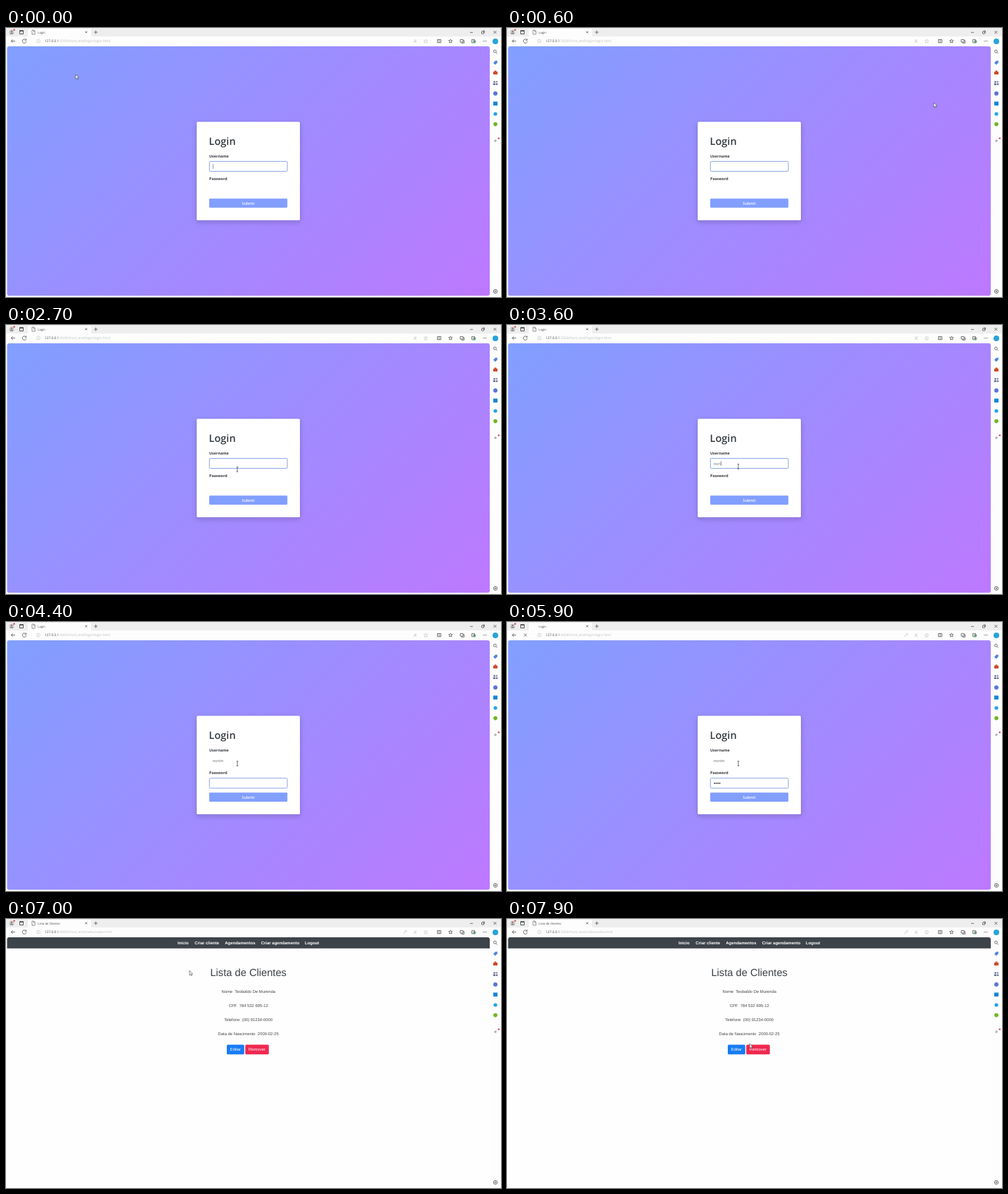
An HTML page for the animation above (8 s loop, 704 by 382 pixels).

```html
<!DOCTYPE html>
<html lang="pt">
<head>
<meta charset="utf-8">
<title>Login</title>
<style>
html, body { margin: 0; width: 100%; height: 100%; overflow: hidden; background: #fff; }
svg { display: block; width: 100vw; height: 100vh; }
text { white-space: pre; text-rendering: geometricPrecision; }
.ui { font-family: "Open Sans", "Noto Sans", sans-serif; }
.site { font-family: "Liberation Sans", Arial, sans-serif; font-size: 5.87px; fill: #43474b; }
.label { font-size: 5.4px; font-weight: 700; fill: #363a40; }
.mid { text-anchor: middle; }
.nav { font-size: 6px; font-weight: 700; fill: #fff; }
.line { fill: none; stroke: #555; stroke-width: .8; }
.faint { stroke: #ccc; }
</style>
</head>
<body>
<svg viewBox="0 0 704 382" preserveAspectRatio="none">
  <defs>
    <linearGradient id="sky" gradientUnits="userSpaceOnUse" x1="85" y1="-57" x2="605" y2="463">
      <stop stop-color="#819fff"/><stop offset="1" stop-color="#bd78ff"/>
    </linearGradient>
    <filter id="shadow" x="-20%" y="-20%" width="140%" height="140%">
      <feDropShadow dx="0" dy="2.5" stdDeviation="3.5" flood-color="#222" flood-opacity=".22"/>
    </filter>
  </defs>

  <!-- browser window -->
  <rect width="704" height="382" fill="#fdfdfd"/>
  <rect width="704" height="12" fill="#eee"/>
  <path d="M31 12V3q0-2 2-2H119q2 0 2 2V12Z" fill="#fdfdfd"/>
  <circle cx="8" cy="6" r="3.6" fill="#ccc"/>
  <circle cx="8" cy="4.8" r="1.3" fill="#888"/><path d="M5.6 8.6a2.4 2.2 0 0 1 4.8 0Z" fill="#888"/>
  <circle cx="11.6" cy="2.6" r="1.2" fill="#d13b3b"/>
  <path class="line" d="M19.5 3.5h5v5h-5ZM19.5 4.4h5" style="stroke:#333"/>
  <path id="tabIcon" class="line" d="M37 3h2.6l1.6 1.7V9H37ZM39.4 3v1.9h1.8" style="stroke-width:.6"/>
  <path class="line" d="m112.8 4.6 2.6 2.6m0-2.6-2.6 2.6M125.2 6h5M127.7 3.5v5M660 6.3h4M676.5 5h3v3h-3ZM677.8 4h2.6v2.8M693.4 4l4 4m0-4-4 4"/>
  <path class="line" d="M13 18.6H7.4m2.4-2.4-2.4 2.4 2.4 2.4"/>
  <path id="reload" class="line" d="M28.4 17a2.8 2.8 0 1 0 .5 2M28.7 15.4v1.9h-1.9"/>
  <path id="stop" class="line" d="m24.2 16.6 4 4m0-4-4 4"/>
  <g class="line faint">
    <circle cx="46" cy="18.6" r="2.5"/><path d="M46 18.2v1.6M46 17v.5"/>
    <path d="m580 21 1.7-4.5 1.7 4.5M580.7 19.6h2M583.8 16.5v1.2"/>
    <path d="m597 16 .8 1.8 2 .2-1.5 1.3.5 2-1.8-1-1.8 1 .5-2-1.5-1.3 2-.2Z"/>
    <path id="key" d="m565 21 2.7-2.8m-1.7 1.8.9.9M570 17.2a1.2 1.2 0 1 1-2.4 0 1.2 1.2 0 1 1 2.4 0"/>
  </g>
  <path class="line" d="M613.5 16.4h5v4.4h-5ZM616 16.4v4.4M629.5 17.6h2l.8-1.6.8 1.6h1.7l-1.3 1.4.4 2-1.6-1-1.7 1 .4-2ZM646 16.4h4v3.6h-4ZM648 20v1.4h3.5v-3.6H650M662.5 16.4h4v4.4h-4ZM664 18.6h4.4"/>
  <path d="M664.8 19h3v2.4h-3Z" fill="#4caf6a"/>
  <g fill="#555"><circle cx="679" cy="18.6" r=".6"/><circle cx="681" cy="18.6" r=".6"/><circle cx="683" cy="18.6" r=".6"/></g>
  <circle cx="696" cy="19" r="4" fill="#27a3d9"/>
  <g class="ui">
    <text id="tab" x="45.3" y="7.7" font-size="4.2" fill="#444"></text>
    <text x="55" y="20.4" font-size="4.8" fill="#444">127.0.0.1<tspan id="url" fill="#bdbdbd"></tspan></text>
  </g>

  <!-- sidebar -->
  <g class="line"><circle cx="695.4" cy="33.2" r="1.9"/><path d="m696.8 34.6 2 2"/></g>
  <path d="m693 49.5 3-3h2.8v2.8l-3 3Z" fill="#4f83d8"/>
  <path d="M693 62h6v4h-6ZM694.6 62v-1.4h2.8V62Z" fill="#cf4b2c"/>
  <g fill="#6a7396"><circle cx="694.6" cy="76.6" r="1.3"/><circle cx="697.8" cy="76.4" r="1.1"/><path d="M692.8 81v-2.4h3.4V81ZM697 81v-2.6h2.2V81Z"/></g>
  <circle cx="696" cy="93" r="3" fill="#5b74d6"/>
  <rect x="693" y="104.5" width="6" height="5.6" fill="#1685d6"/>
  <circle cx="696" cy="122" r="2.6" fill="#1fa6e6"/>
  <circle cx="696" cy="136.6" r="2.8" fill="#6fb722"/>
  <path class="line" d="M694 160.2h4M696 158.2v4" style="stroke:#888"/>
  <circle cx="700.8" cy="156.6" r="1.2" fill="#c92b4b"/>
  <g class="line"><circle cx="696" cy="374" r="2.7"/><circle cx="696" cy="374" r=".9"/></g>

  <!-- login page -->
  <g id="login" class="ui">
    <rect x="1.5" y="26" width="686.5" height="354.3" rx="3" fill="url(#sky)"/>
    <rect x="271.3" y="133.3" width="146.7" height="139.7" rx="1.6" fill="#fff" filter="url(#shadow)"/>
    <text x="288.6" y="165.6" font-size="14.5" font-weight="600" fill="#353a40">Login</text>
    <text class="label" x="289" y="184">Username</text>
    <text class="label" x="289" y="216.2">Password</text>
    <g fill="#fff" stroke="#7c9bdc" stroke-width=".9">
      <rect id="userBox" x="289.3" y="189.4" width="110.8" height="14.2" rx="1.5"/>
      <rect id="passBox" x="289.3" y="221.8" width="110.8" height="14.2" rx="1.5"/>
    </g>
    <text id="user" x="294" y="198.8" font-size="5.4" fill="#5a6068"></text>
    <g id="dots" fill="#333"></g>
    <rect id="caret" width=".7" height="6.8" fill="#6b7580"/>
    <rect x="289" y="242.2" width="111.2" height="13" rx="1.4" fill="#829fff"/>
    <text class="mid" x="344.6" y="250.8" font-size="5.3" font-weight="600" fill="#fff">Submit</text>
  </g>

  <!-- client list page -->
  <g id="list" class="site">
    <rect x="1.5" y="26" width="686.5" height="354.3" rx="3" fill="#fefefe"/>
    <path d="M1.5 41.7V29q0-3 3-3H685q3 0 3 3V41.7Z" fill="#3c4349"/>
    <g class="nav">
      <text x="244" y="35.8">Inicio</text>
      <text x="268.3" y="35.8">Criar cliente</text>
      <text x="311.2" y="35.8">Agendamentos</text>
      <text x="362.7" y="35.8">Criar agendamento</text>
      <text x="425" y="35.8">Logout</text>
    </g>
    <g class="mid">
      <text x="344.7" y="81" font-size="14.68" fill="#3a4046">Lista de Clientes</text>
      <text x="344.7" y="105.2">Nome  Teobaldo De Murenda</text>
      <text x="344.7" y="125.2">CPF  784 532 695-12</text>
      <text x="344.7" y="145">Telefone  (00) 91234-0000</text>
      <text x="344.7" y="164.8">Data de Nascimento  2000-02-25</text>
      <rect x="314" y="178.6" width="24.8" height="13.7" rx="1.5" fill="#187cf6"/>
      <rect x="340.3" y="178.6" width="33.5" height="13.7" rx="1.5" fill="#ef2950"/>
      <g fill="#fff"><text x="326.4" y="187.4">Editar</text><text x="357" y="187.4">Remover</text></g>
    </g>
  </g>

  <path id="arrow" d="M0 0V6.4L1.5 5.1 2.5 7.3 3.5 6.9 2.6 4.7H4.5Z" fill="#fff" stroke="#333" stroke-width=".55"/>
  <path id="beam" class="line" d="M-1.2-3.3H1.2M0-3.3V3.3M-1.2 3.3H1.2" style="stroke:#333;stroke-width:.7"/>
</svg>
<script>
const LOOP = 8000, STEP = 100, LOADED = 6000;
const $ = id => document.getElementById(id);
const show = (id, on) => $(id).style.display = on ? '' : 'none';

// pointer: time, x, y
const path = [
  [0, 99, 66], [300, 400, 24], [500, 661, 60], [600, 607, 106], [1200, 607, 106],
  [1500, 327, 210], [2100, 121, 241], [2500, 341, 214], [2700, 329, 205],
  [2800, 329, 205], [3000, 329, 201], [5900, 329, 201], [6000, 325, 197], [6300, 325, 197],
  [6500, 326, 184], [6900, 264, 90], [7200, 255, 40], [7600, 322, 150],
  [7700, 347, 183], [7800, 358, 180], [7900, 345, 177]
];
const name = 'norim';
const dotTimes = [4500, 4700, 4900, 5100];

dotTimes.forEach((_, i) => $('dots').insertAdjacentHTML('beforeend',
  `<circle cx="${295.2 + 2.45 * i}" cy="229" r=".9"/>`));

function pointerAt(t) {
  const i = path.findIndex(p => p[0] > t);
  if (i < 0) return path[path.length - 1].slice(1);
  const [t0, x0, y0] = path[i - 1], [t1, x1, y1] = path[i];
  const k = (t - t0) / (t1 - t0);
  return [x0 + (x1 - x0) * k, y0 + (y1 - y0) * k];
}

function caretOn(t) {
  if (t < 600) return true;
  if (t < 2900) return Math.floor((t - 600) / 500) % 2 === 1;
  return t < 4400 || (t >= 4500 && t < 5700);
}

function drawPointer(t) {
  const [x, y] = pointerAt(t);
  const inField = (y >= 189 && y <= 206) || (y >= 221 && y <= 236);
  const beam = t < LOADED && x > 289 && x < 400 && inField;
  show('beam', beam);
  show('arrow', !beam);
  $(beam ? 'beam' : 'arrow').setAttribute('transform', `translate(${x} ${y})`);
}

function drawForm(t) {
  const typed = Math.max(0, Math.floor((t - 2900) / 180) + 1);
  $('user').textContent = name.slice(0, typed);
  const swap = t < 3800 ? 0 : t < 3900 ? .5 : 1;
  $('userBox').style.strokeOpacity = 1 - swap;
  $('passBox').style.strokeOpacity = swap;

  const count = dotTimes.filter(d => t >= d).length;
  [...$('dots').children].forEach((dot, i) => dot.style.display = i < count ? '' : 'none');

  const inPass = swap > 0;
  const x = inPass ? 294.1 + 2.45 * count : 294.1 + (typed ? $('user').getComputedTextLength() : 0);
  $('caret').setAttribute('x', x);
  $('caret').setAttribute('y', inPass ? 225.6 : 193.2);
  show('caret', caretOn(t));
}

function draw(now) {
  const t = Math.floor(now % LOOP / STEP) * STEP;
  const loaded = t >= LOADED, loading = t >= 5900 && !loaded;
  const page = loaded ? 'index' : 'login';
  show('login', !loaded);
  show('list', loaded);
  show('tabIcon', !loading);
  show('reload', !loading);
  show('stop', loading);
  show('key', t >= 4500);
  $('tab').textContent = loaded ? 'Lista de Clientes' : 'Login';
  $('url').textContent = `:5500/front_end/${page}/${page}.html`;
  if (!loaded) drawForm(t);
  drawPointer(t);
  requestAnimationFrame(tick);
}

let start;
function tick(now) {
  start ??= now;
  draw(now - start);
}
draw(0);
</script>
</body>
</html>
```
